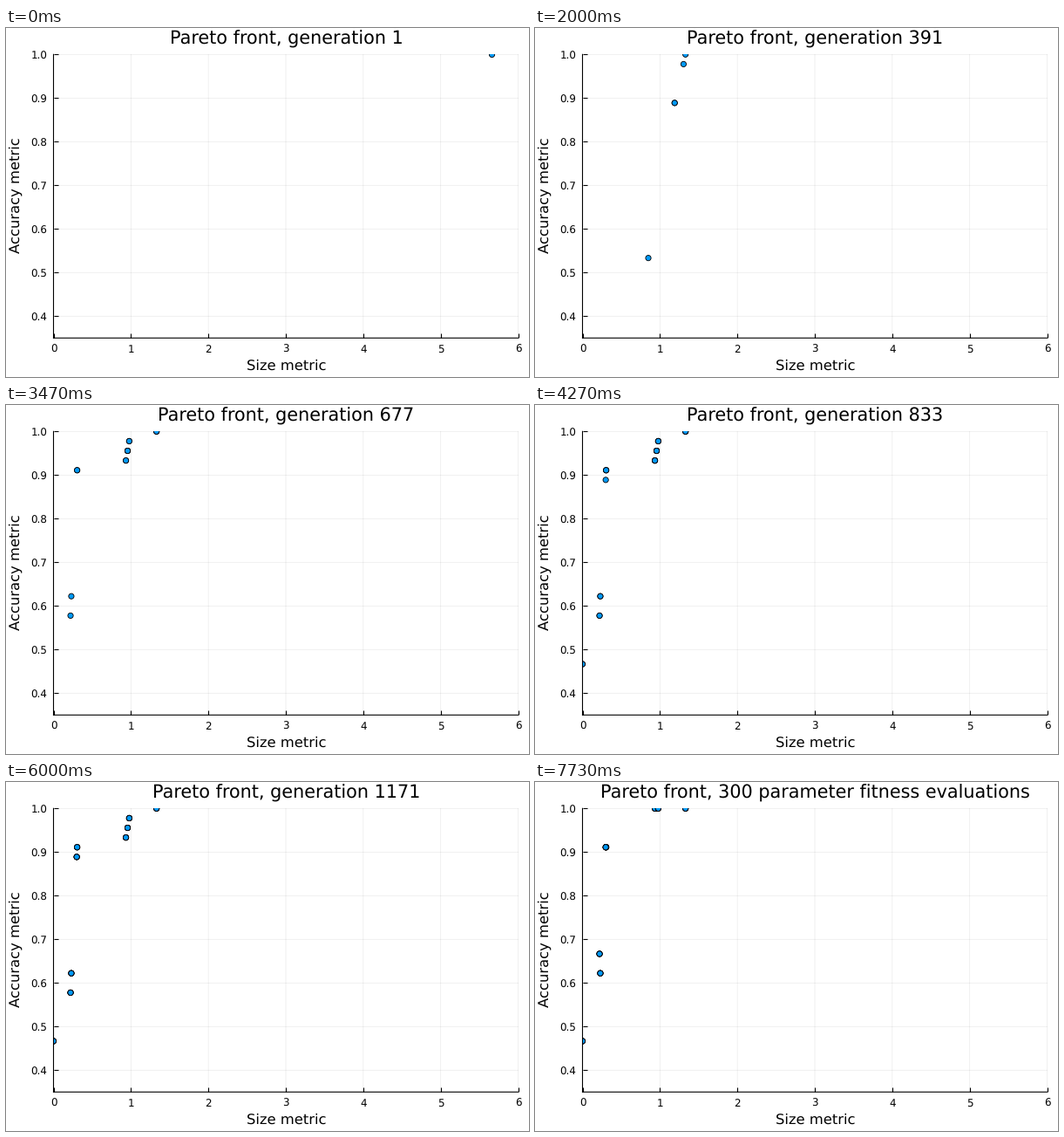
A matplotlib script for the animation above (8000 ms loop, 600x400 px).

```python
import matplotlib.pyplot as plt
import numpy as np
from matplotlib.animation import FuncAnimation

WIDTH, HEIGHT, DPI = 600, 400, 100
PX = 72 / DPI  # points per pixel
LEFT, RIGHT, TOP, BOTTOM = 54.5, 587.5, 30.3, 355.3
LOOP_MS, INTERVAL = 8000, 20
STEPS_PER_SECOND = 15
STRIDE, GENERATIONS, TOTAL = 13, 1200, 1500
SAMPLES = 45
FIND_EVERY = 46

# Discoveries in order, evenly spaced in time: size metric, correct samples
FINDS = [
    (1.42, 28), (1.63, 44), (1.56, 42), (1.19, 40), (1.05, 23), (0.85, 24),
    (1.33, 45), (1.305, 44), (0.957, 43), (0.935, 42), (0.305, 41),
    (0.978, 44), (0.23, 28), (0.22, 26), (0, 21), (0.3, 40),
]
# Samples won by parameter tuning, by size metric
GAINS = {0.22: 4, 0.3: 1, 0.935: 3, 0.957: 2, 0.978: 1}
TUNING_LENGTH = 60

plt.rcParams.update({
    "font.family": "DejaVu Sans",
    "text.hinting": "none",
    "toolbar": "None",
})

fig = plt.figure(figsize=(WIDTH / DPI, HEIGHT / DPI), dpi=DPI, facecolor="white")
ax = fig.add_axes((LEFT / WIDTH, 1 - BOTTOM / HEIGHT,
                   (RIGHT - LEFT) / WIDTH, (BOTTOM - TOP) / HEIGHT))


def label(x, y, text, size, **style):
    """Place text by its baseline, in pixels from the top left."""
    style = {"ha": "center", "va": "baseline", **style}
    return fig.text(x / WIDTH, 1 - y / HEIGHT, text, fontsize=size * PX, **style)


def setup_axes():
    x_ticks = np.arange(7)
    y_ticks = np.arange(4, 11) / 10
    ax.set(xlim=(0, 6), ylim=(0.35, 1), xticks=x_ticks, yticks=y_ticks)
    ax.tick_params(direction="in", length=5 * PX, width=1.1 * PX,
                   labelbottom=False, labelleft=False)
    ax.grid(color="black", alpha=0.08, linewidth=0.75 * PX)
    ax.set_axisbelow(True)
    plt.setp(ax.get_xgridlines() + ax.get_ygridlines(), snap=False)
    ax.spines[["top", "right"]].set_visible(False)
    plt.setp([ax.spines.left, ax.spines.bottom], linewidth=1.1 * PX, snap=False)

    for x in x_ticks:
        label(LEFT + x * (RIGHT - LEFT) / 6, 371.5, str(x), 11.9)
    for y in y_ticks:
        label(47.5, TOP + (1 - y) * 500 + 5.5, f"{y:.1f}", 11.9, ha="right")
    label(321.5, 392, "Size metric", 16.4)
    label(11.3, 192, "Accuracy metric", 16.4, rotation=90, va="center")


def discoveries():
    """(tick found, size, hits): exact solutions shrink while others appear."""
    exact = [(1 + 26 * k, 5.66 * (2 / 5.66) ** (k / 5), SAMPLES) for k in range(6)]
    return exact + [(FIND_EVERY * n, *find) for n, find in enumerate(FINDS, 1)]


def pareto_front(tick):
    found = [d for d in SOLUTIONS if d[0] <= tick]
    return [a for a in found
            if not any(b != a and b[1] <= a[1] and b[2] >= a[2] for b in found)]


def marker_positions(tick):
    """Front members, tuned late on; older ones have gathered more copies."""
    tuning = np.clip((tick - GENERATIONS) / TUNING_LENGTH, 0, 1)
    points = []
    for born, size, hits in pareto_front(min(tick, GENERATIONS)):
        hits += int(GAINS.get(size, 0) * tuning)
        copies = min(4, 1 + (tick - born) // 120)
        points += [(size, hits / SAMPLES)] * copies
    return points


SOLUTIONS = discoveries()
setup_axes()
title = label(321.5, 18.2, "", 20.8)
markers = ax.scatter([], [], color="#009afa", edgecolor="black",
                     linewidth=0.85 * PX, zorder=5, snap=False)


def update(frame):
    step = (frame * INTERVAL + 14) * STEPS_PER_SECOND // 1000
    tick = min(1 + STRIDE * step, TOTAL)
    if tick <= GENERATIONS:
        title.set_text(f"Pareto front, generation {tick}")
    else:
        title.set_text(f"Pareto front, {tick - GENERATIONS} parameter fitness evaluations")
    points = marker_positions(tick)
    markers.set_offsets(points)
    markers.set_sizes(np.full(len(points), (6.2 * PX) ** 2), DPI)
    return title, markers


animation = FuncAnimation(fig, update, frames=LOOP_MS // INTERVAL,
                          interval=INTERVAL, repeat=True, repeat_delay=0)
plt.show()
```
